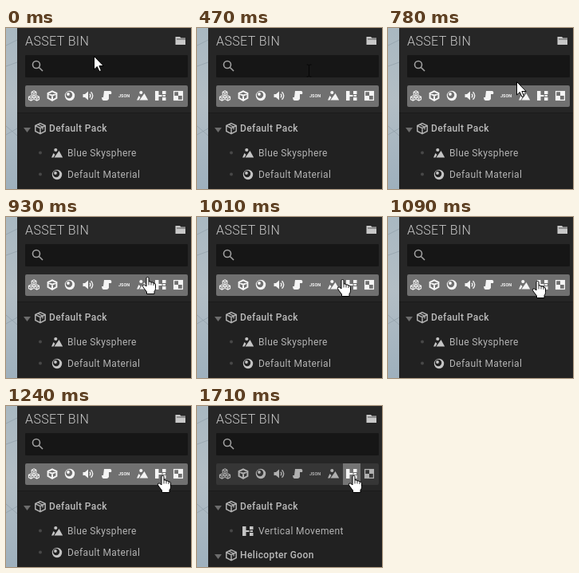
Recreate the animation shown at these times as an HTML page. Size 232 px wide and 202 px high, loop 3160 ms.

```html
<!DOCTYPE html>
<html lang="en">
<head>
<meta charset="utf-8">
<style>
  html, body { margin: 0; width: 100%; height: 100%; overflow: hidden; background: #262626; }
  svg { display: block; }
  text { font: 12px Roboto, sans-serif; letter-spacing: .38px; fill: #b4b4b4; }
  .pack { font-weight: 500; fill: #bcbcbc; }
  .title { font-size: 16px; font-weight: 300; fill: #c8c8c8; }
  .json { font: 700 5.5px Roboto, sans-serif; letter-spacing: 0; fill: currentColor; }
  .line { fill: none; stroke: currentColor; stroke-width: 1.3; }
  .thick { fill: none; stroke: currentColor; stroke-width: 2; }
  .cursor { fill: #fff; stroke: #000; stroke-width: 1; }
</style>
</head>
<body>
<svg width="232" height="202" viewBox="0 0 232 202">
  <defs>
    <linearGradient id="sky" x2="0" y2="1">
      <stop stop-color="#a9b8c1"/><stop offset=".45" stop-color="#b3bec5"/><stop offset="1" stop-color="#9eb0bd"/>
    </linearGradient>
    <path id="cube" d="M0-5.6 5.4-3V3L0 5.8-5.4 3V-3ZM-5.4-3 0-.2 5.4-3M0-.2V5.8"/>
    <g id="package">
      <use href="#cube" class="line" transform="scale(1.15)"/>
      <path class="line" d="M-3.2-5 3-1.800V1.500"/>
    </g>
    <use id="box" href="#cube" class="thick"/>
    <g id="boxes">
      <use href="#box" transform="translate(0 -3.2) scale(.53)"/>
      <use href="#box" transform="translate(-3.7 3) scale(.53)"/>
      <use href="#box" transform="translate(3.7 3) scale(.53)"/>
    </g>
    <g id="sphere">
      <path fill-rule="evenodd" d="M-6.200 0A6.200 6.200 0 1 1 6.200 0 6.200 6.200 0 1 1-6.200 0ZM-5.200-1A4.200 4.200 0 1 0 3.200-1 4.200 4.200 0 1 0-5.200-1Z"/>
      <circle cx="-2" cy="-2" r="1.9"/>
    </g>
    <g id="sound">
      <path d="M-6.500-2H-4L0-5.500V5.500L-4 2H-6.500Z"/>
      <path d="M2-2.300Q4 0 2 2.300M3.500-4.800Q8 0 3.500 4.800" class="line"/>
    </g>
    <path id="script" d="M-3-6H5Q7-5 6-2H3V4Q2 6 0 6H-4Q-6 5-6 2H-4Z"/>
    <text id="json" class="json" y="2" text-anchor="middle">JSON</text>
    <g id="scene">
      <path d="M-3.500 5.500 2.500-3 7.200 5.500ZM-7 5.500-4.500 0-2.500 2-4.500 5.500Z"/>
      <circle cx="-1.700" cy="-4" r="2.100"/>
    </g>
    <path id="motion" d="M-7-6H-2.500V6H-7ZM-2.500-1H1.500V1H-2.500ZM2-6H6.500V-2H2ZM2.500-1H6V1H2.500ZM2 2H6.500V6H2Z"/>
    <g id="checker">
      <rect x="-5.400" y="-5.400" width="10.800" height="10.800" class="line"/>
      <path d="M0-5.500H5.500V0H0ZM-5.500 0H0V5.500H-5.500Z"/>
    </g>
    <path id="arrow" class="cursor" d="M0 0V16.500L3.800 13 6.500 19 9 18 6.400 12H11.700Z"/>
    <path id="beam" fill="none" stroke="#050505" d="M-3-7.500H-1L0-6.500 1-7.500H3M0-6.500V6.500M-3 7.500H-1L0 6.500 1 7.500H3"/>
    <g id="hand">
      <path class="cursor" d="M-1.500 1.700Q-1.500.500 0 .500T1.500 1.700V6Q4 5.300 4.500 7 7 6.300 7.500 8 10 7.600 10 10V14.500Q10 17 8.500 18.500V21.500H-1V19L-5.500 13Q-7 11-5.500 10-4 9.300-1.500 12Z"/>
      <path fill="none" stroke="#000" stroke-width=".8" d="M1.500 6V10.500M4.500 7V10.500M7.500 8V11"/>
    </g>
  </defs>

  <path fill="url(#sky)" d="M0 0H14V202H0Z"/>
  <path fill="none" stroke="#8795a0" stroke-opacity=".55" d="M0 22 14 15M0 48 14 43M0 123 14 135M0 134 14 126"/>
  <path fill="#262626" d="M14 0H232V202H14Z"/>
  <path fill="#212121" d="M14 107H232V202H14Z"/>
  <path fill="#1b1b1b" d="M14 106H232V107H14Z"/>
  <text class="title" x="24" y="22">ASSET BIN</text>
  <path fill="#c8c8c8" d="M212.500 11H218L219.500 12.500H225V21H212.500Z"/>
  <path stroke="#262626" stroke-width=".7" d="M214 14H225"/>
  <rect x="24" y="34" width="204" height="28" rx="1" fill="#161616"/>
  <g fill="none" stroke="#a0a0a0" stroke-width="1.6">
    <circle cx="38" cy="46" r="4.500"/><path d="M41.200 49.200 46 54"/>
  </g>
  <rect id="bar" x="24" y="72" width="204" height="27" rx="2"/>
  <rect id="active" x="183" y="72" width="22" height="27" fill="#747474"/>
  <g id="tools"></g>
  <g id="before"></g>
  <g id="after"></g>
  <use id="pointer"/>
</svg>
<script>
const get = id => document.getElementById(id);
const icon = (name, x, y, color) =>
  `<use href="#${name}" x="${x}" y="${y}" fill="${color}" color="${color}"/>`;

const packRow = (label, y) =>
  `<path d="M22 ${y - 1}H31L26.5 ${y + 5}Z" fill="#6c6c6c"/>` +
  icon('package', 43, y, '#b0b0b0') +
  `<text class="pack" x="54" y="${y + 4}">${label}</text>`;

const itemRow = (label, name, y) =>
  `<circle cx="43" cy="${y - .5}" r="2" fill="#484848"/>` +
  icon(name, 64, y, '#c4c4c4') +
  `<text x="77" y="${y + 4}">${label}</text>`;

const tools = ['boxes', 'box', 'sphere', 'sound', 'script', 'json', 'scene', 'motion', 'checker'];
get('tools').innerHTML = tools.map((name, i) =>
  icon(name, Math.round(35 + i * 22.65), 85, 'white')).join('');
const toolIcons = [...get('tools').children];

get('before').innerHTML = packRow('Default Pack', 126) +
  itemRow('Blue Skysphere', 'scene', 157) + itemRow('Default Material', 'sphere', 184);
get('after').innerHTML = packRow('Default Pack', 126) +
  itemRow('Vertical Movement', 'motion', 157) + packRow('Helicopter Goon', 187);

// The pointer jumps between sampled positions: time, shape, x, y
const path = [
  [0, 'arrow', 110.5, 35.5], [470, 'beam', 140.5, 53.5], [550, 'beam', 147.5, 57.5],
  [630, 'beam', 152.5, 60.5], [700, 'arrow', 157.5, 64.5], [780, 'arrow', 161.5, 67.5],
  [860, 'hand', 171.5, 72], [930, 'hand', 177.5, 75], [1010, 'hand', 182.5, 78],
  [1090, 'hand', 187.5, 80], [1160, 'hand', 192.5, 84], [1240, 'hand', 196.5, 87]
];
const LOOP = 3160, FILTER_TIME = 1710;

function draw() {
  const time = performance.now() % LOOP;
  const filtered = time >= FILTER_TIME;
  const [, shape, x, y] = path.findLast(step => step[0] <= time);
  get('pointer').setAttribute('href', '#' + shape);
  get('pointer').setAttribute('transform', `translate(${x} ${y})`);
  get('bar').setAttribute('fill', filtered ? '#363636' : '#707070');
  get('active').style.display = filtered ? '' : 'none';
  get('before').style.display = filtered ? 'none' : '';
  get('after').style.display = filtered ? '' : 'none';
  toolIcons.forEach((el, i) => {
    const color = filtered && tools[i] !== 'motion' ? '#b0b0b0' : '#f4f4f4';
    el.setAttribute('fill', color);
    el.setAttribute('color', color);
  });
  requestAnimationFrame(draw);
}
draw();
</script>
</body>
</html>
```
